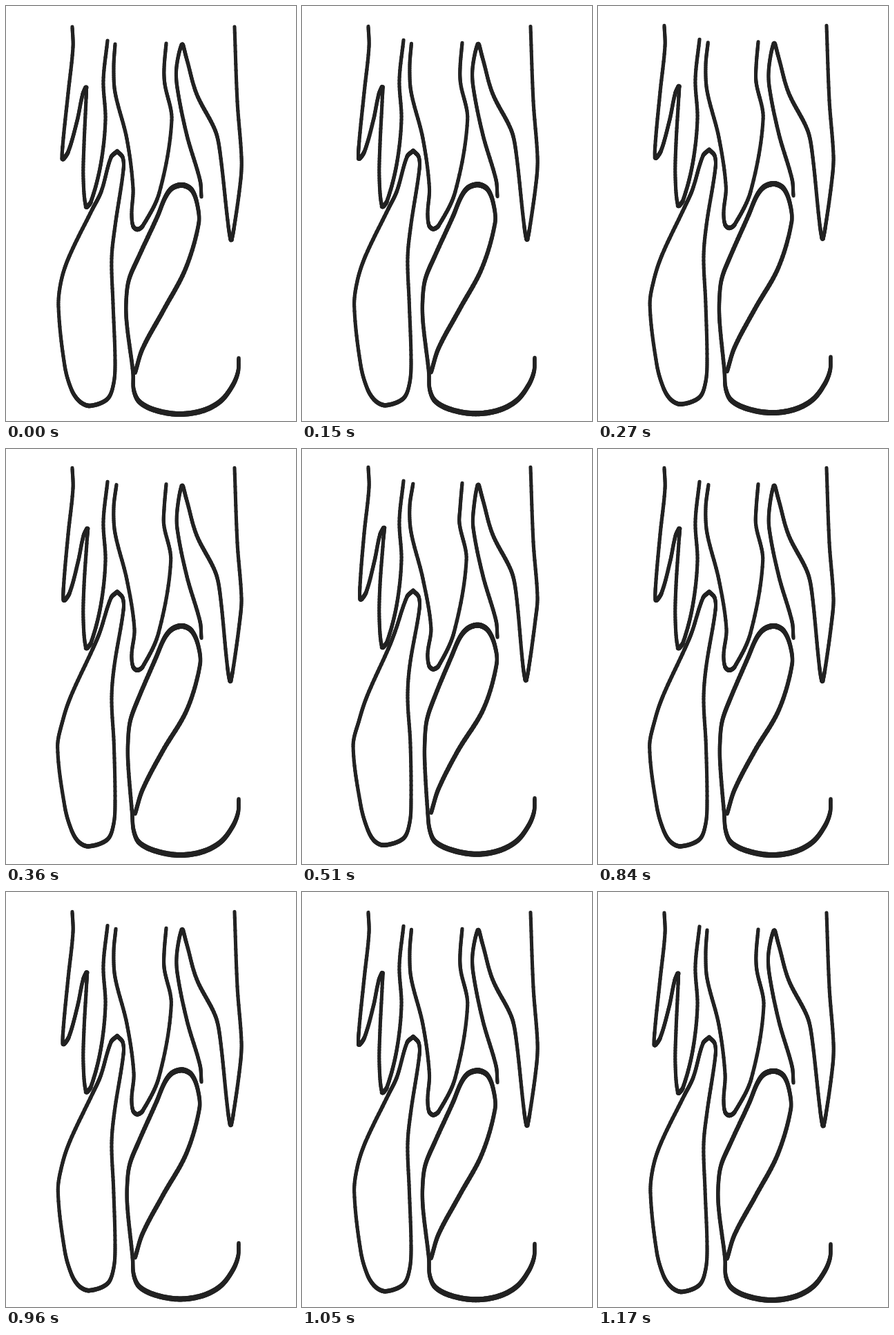
An HTML page with a canvas that plays this animation: 420 px wide and 600 px high, repeating every 1.2 s.

```html
<!DOCTYPE html>
<html lang="en">
<head>
<meta charset="utf-8">
<title>Ink line dance</title>
<style>
  html, body { margin: 0; height: 100%; overflow: hidden; background: #fff; }
  canvas { display: block; }
</style>
</head>
<body>
<canvas id="stage" width="420" height="600"></canvas>
<script>
const LOOP = 1200, STEP = 30, INK = '#222';
const ctx = document.getElementById('stage').getContext('2d');

// Points are x, y and, where needed, the sideways sway.
// "rise" is the upward sway; "nib" is the pen width and its gain on flat strokes.
const leftFolds = {
  rise: 4, nib: [5, 2],
  points: [
    [96, 30], [97, 60], [90, 126], [82, 203, 2], [82, 221, 3], [90, 211, 3],
    [103, 166, 2], [111, 128, 2], [116, 118, 3], [116, 134, 2], [113, 200],
    [112, 250], [116, 290], [123, 283], [137, 230], [144, 165], [141, 108], [147, 50]
  ]
};
const middleFold = {
  rise: 5, nib: [5, 1.5],
  points: [
    [158, 55, 3], [156, 88], [158, 125], [175, 192], [184, 263, 3], [182, 300],
    [184, 318], [190, 323], [198, 318], [222, 270, -2], [240, 165, -2],
    [230, 113, -2], [229, 90], [232, 54]
  ]
};
const rightFolds = {
  rise: 4, nib: [5, 2],
  points: [
    [283, 276], [281, 252], [262, 187], [248, 118], [247, 88, 2], [255, 56],
    [261, 74], [276, 127], [303, 180], [310, 212], [322, 318, -2], [326, 338, -2],
    [330, 322, -2], [340, 250, -2], [341, 218], [335, 138], [331, 30]
  ]
};
const leftShoe = {
  rise: 5.5, nib: [5, 1.5],
  points: [
    [161, 210], [169, 219], [170, 237], [158, 318, -2], [153, 365], [155, 430, 2],
    [158, 512], [156, 545], [147, 568], [122, 578, -3], [107, 572, -2], [95, 555],
    [85, 520], [76, 435, -2], [80, 397, 3], [92, 361, 3], [125, 294],
    [138, 268, -3], [152, 219], [161, 210]
  ]
};
const rightShoe = {
  rise: 4.5, nib: [5.3, 2.7],
  points: [
    [337, 509], [336, 529], [328, 549], [311, 571], [285, 585], [250, 590, 2],
    [215, 584, 2], [193, 572], [185, 555], [184, 530, -2], [175, 460, 3],
    [174, 428, 4], [178, 396, 3], [192, 363], [219, 305, -3], [231, 276, -2],
    [241, 263], [256, 259], [269, 266], [277, 287, 2], [279, 315, 3],
    [260, 380, 3], [228, 440, -2], [198, 495], [187, 530]
  ]
};
const strokes = [leftFolds, middleFold, rightFolds, leftShoe, rightShoe];

// Direction of the curve at point i, weighted by the neighbouring chords.
function tangent(pts, i) {
  const a = pts[i - 1] || pts[i], b = pts[i], c = pts[i + 1] || b;
  const span = Math.hypot(b.x - a.x, b.y - a.y) + Math.hypot(c.x - b.x, c.y - b.y);
  return { x: (c.x - a.x) / span, y: (c.y - a.y) / span };
}

const hermite = (p, q, m, n, u) =>
  p + u * (m + u * (3 * (q - p) - 2 * m - n + u * (2 * (p - q) + m + n)));

function drawStroke({ points, rise, nib }, sway) {
  const pts = points.map(([x, y, dx = 0]) => ({ x: x + dx * sway, y: y - rise * sway }));
  let prev = pts[0];
  for (let i = 0; i < pts.length - 1; i++) {
    const p = pts[i], q = pts[i + 1];
    const m = tangent(pts, i), n = tangent(pts, i + 1);
    const chord = Math.hypot(q.x - p.x, q.y - p.y);
    const at = (axis, u) => hermite(p[axis], q[axis], m[axis] * chord, n[axis] * chord, u);
    for (let s = 1; s <= 12; s++) {
      const next = { x: at('x', s / 12), y: at('y', s / 12) };
      const dx = next.x - prev.x, dy = next.y - prev.y;
      ctx.lineWidth = nib[0] + nib[1] * Math.abs(dx) / Math.hypot(dx, dy);
      ctx.beginPath();
      ctx.moveTo(prev.x, prev.y);
      ctx.lineTo(next.x, next.y);
      ctx.stroke();
      prev = next;
    }
  }
}

function draw() {
  const t = Math.floor(performance.now() % LOOP / STEP) * STEP;
  const sway = (1 - Math.cos(2 * Math.PI * t / LOOP)) / 2;
  ctx.fillStyle = '#fff';
  ctx.fillRect(0, 0, 420, 600);
  ctx.strokeStyle = INK;
  ctx.lineCap = 'round';
  strokes.forEach(stroke => drawStroke(stroke, sway));
  requestAnimationFrame(draw);
}
draw();
</script>
</body>
</html>
```
